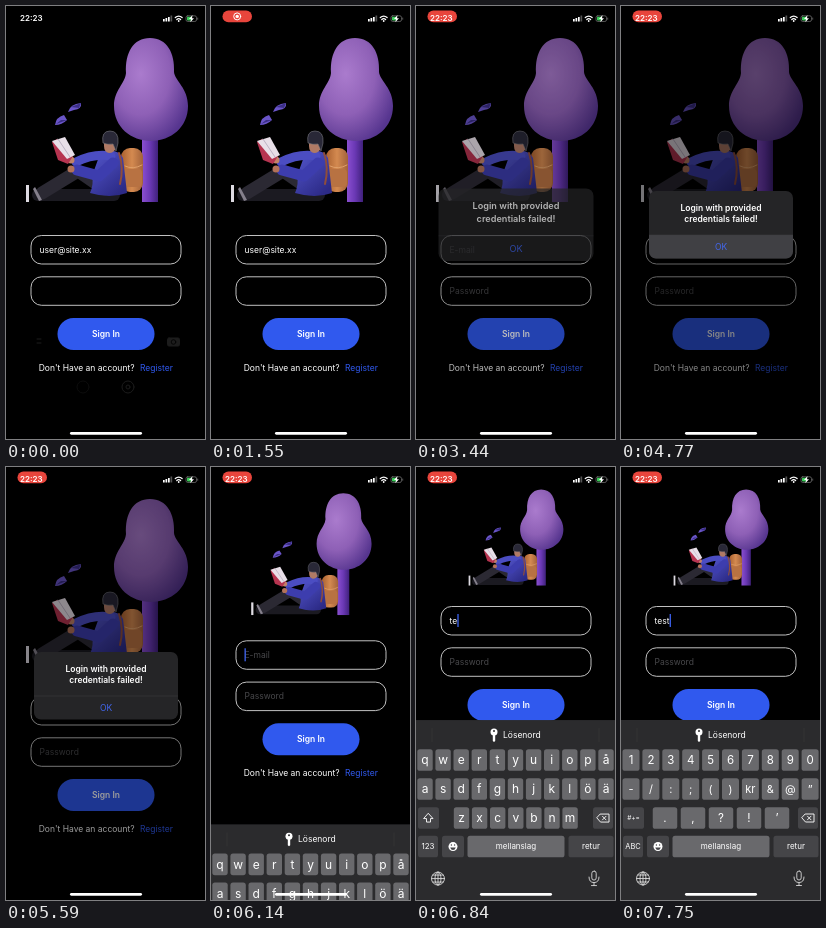
These frames come from a looping animation (199 by 433 pixels, 8 s). An HTML page:

```html
<!DOCTYPE html>
<html lang="en">
<head>
<meta charset="utf-8">
<title>Sign in</title>
<style>
html, body { margin: 0; width: 100%; height: 100%; overflow: hidden; background: #000; }
svg { display: block; width: 100vw; height: 100vh; font: 8.5px Inter, "Noto Sans", sans-serif; fill: #fff; }
.mid { text-anchor: middle; }
.hint { fill: #48484b; }
.field { fill: #000; stroke: #d6d6d6; stroke-width: .9; }
.line { fill: none; stroke-linecap: round; stroke-linejoin: round; }
</style>
</head>
<body>
<svg viewBox="0 0 199 433">
  <defs>
    <radialGradient id="crown" cx=".36" cy=".35" r=".72">
      <stop offset="0" stop-color="#aa7bcd"/><stop offset=".55" stop-color="#8e60b6"/><stop offset="1" stop-color="#56358f"/>
    </radialGradient>
    <linearGradient id="trunk">
      <stop offset="0" stop-color="#8a4fd0"/><stop offset=".5" stop-color="#6a38b4"/><stop offset="1" stop-color="#40217c"/>
    </linearGradient>
    <linearGradient id="coat" x2=".7" y2="1">
      <stop offset="0" stop-color="#5558cf"/><stop offset="1" stop-color="#2c2a86"/>
    </linearGradient>
    <linearGradient id="bag">
      <stop offset="0" stop-color="#a9602f"/><stop offset=".5" stop-color="#d48a50"/><stop offset="1" stop-color="#a2623a"/>
    </linearGradient>
  </defs>
  <rect width="199" height="433" fill="#000"/>

  <g id="login">
    <g id="art">
      <path fill="url(#trunk)" d="M136 128H152V196H136Z"/>
      <path fill="url(#crown)" d="M144 32C161 32 169 47 168 66C169 75 182 82 182 100C182 121 165 135 145 135C125 135 108 121 108 100C108 84 119 78 120 67C119 47 127 32 144 32Z"/>
      <path fill="#6a55c8" d="M62 106Q64 98 75 97Q76 103 68 104ZM49 119Q50 111 58 109L61 114Q56 119 49 119Z"/>
      <path fill="#3b2f86" d="M65 101L75 97L73 102ZM50 118L55 114L61 114Z"/>
      <path class="line" stroke="#1b1a21" stroke-width="12" d="M108 189L32 189"/>
      <path class="line" stroke="#2b2933" stroke-width="13" d="M98 183L72 165L36 187"/>
      <path fill="#dedbe2" d="M20 179H23V196H20Z"/>
      <path fill="#85808c" d="M27 183L29 181L36 194L33 195Z"/>
      <rect x="115" y="142" width="22" height="44" rx="9" fill="url(#bag)"/>
      <rect x="118" y="163" width="18" height="18" rx="4" fill="#b87242"/>
      <path class="line" stroke="#e0a06a" d="M119 160Q127 164 136 159"/>
      <path fill="url(#coat)" d="M94 148Q110 140 117 152L121 187Q104 193 84 187Q88 178 86 170Z"/>
      <path class="line" stroke="#4b4dc2" stroke-width="9" d="M105 150Q88 147 70 156"/>
      <path class="line" stroke="#3d3dae" stroke-width="11" d="M107 157L93 170L71 164"/>
      <path class="line" stroke="#8f4d3b" stroke-width="2" d="M113 147Q118 162 114 178"/>
      <circle cx="65" cy="154" r="3.5" fill="#c28268"/>
      <circle cx="65" cy="163" r="3.5" fill="#b37259"/>
      <path fill="#b63450" d="M46 136L51 133L67 150L62 158L52 154Z"/>
      <path fill="#e8dfe8" d="M46 135L59 131L69 149L61 153Z"/>
      <path class="line" stroke="#a99eb3" stroke-width=".7" d="M52 133L64 151"/>
      <path fill="#b07a65" d="M98 135H110V142Q108 147 103 147Q98 146 98 140Z"/>
      <path fill="#292837" stroke="#77777f" stroke-width=".6" d="M97 137Q95 125 104 125Q113 125 112 137L110 145L107 138Q102 139 97 137Z"/>
    </g>
    <g id="form">
      <rect class="field" x="25" y="229.5" width="150" height="28.5" rx="10.5"/>
      <text id="email" x="33.5" y="247">E-mail</text>
      <rect id="caret" y="237" width="1.3" height="13" fill="#3d63f2"/>
      <rect class="field" x="25" y="270.8" width="150" height="28.5" rx="10.5"/>
      <text id="password" class="hint" x="33.5" y="288.2">Password</text>
      <g id="button">
        <rect x="51.5" y="312" width="97" height="32" rx="16" fill="#3059ee"/>
        <text class="mid" x="100" y="331" font-weight="600">Sign In</text>
      </g>
      <text x="32.7" y="365">Don't Have an account?</text>
      <text x="134" y="365" fill="#3059ee">Register</text>
    </g>
    <g id="ghost" class="line" stroke="#1c1c1c">
      <rect x="161.500" y="332" width="12" height="8" rx="1.500" fill="#1c1c1c"/>
      <circle cx="167.500" cy="336" r="2.300" stroke="#050505"/>
      <path d="M31 333H35M31 337H35"/>
      <circle cx="122" cy="381" r="6"/><circle cx="122" cy="381" r="2"/>
      <circle cx="77" cy="381" r="6" stroke="#0d0d0d"/>
    </g>
  </g>

  <g id="spinner" class="line" stroke-width="1"></g>
  <rect id="dim" width="199" height="433" fill="#000"/>

  <g id="alert">
    <rect x="28" y="185" width="144" height="67.5" rx="7" fill="#252527"/>
    <path id="press" fill="#404044" d="M28 229H172V245.500A7 7 0 0 1 165 252.500H35A7 7 0 0 1 28 245.500Z"/>
    <path d="M28 229H172" stroke="#3d3d40" stroke-width=".5"/>
    <g class="mid" font-weight="600">
      <text x="100" y="204.500">Login with provided</text>
      <text x="100" y="216">credentials failed!</text>
    </g>
    <text class="mid" x="100" y="244" fill="#4266ec">OK</text>
  </g>

  <g id="keyboard">
    <rect y="253" width="199" height="190" fill="#2b2b2d"/>
    <path d="M16 261V275M183 261V275" stroke="#39393b" stroke-width=".6"/>
    <circle cx="78" cy="265" r="3.500"/><path d="M76.800 267H79.200V274L78 275L76.800 274Z"/>
    <circle cx="78" cy="264" r="1" fill="#2b2b2d"/>
    <text x="87" y="271">Lösenord</text>
    <g id="letters"></g>
    <g id="symbols"></g>
    <g id="common"></g>
    <g class="line" stroke="#d8d8d8" stroke-width=".9">
      <circle cx="22" cy="411.500" r="6.500"/><ellipse cx="22" cy="411.500" rx="3" ry="6.500"/>
      <path d="M22 405V418M15.500 411.500H28.500M17 408H27M17 415H27"/>
      <rect x="175.800" y="404" width="4.400" height="9" rx="2.200"/>
      <path d="M173 410Q173 415.500 178 415.500Q183 415.500 183 410M178 415.500V418.500M175.500 418.500H180.500"/>
    </g>
  </g>

  <g id="status">
    <rect id="pill" x="11.500" y="4.500" width="29.500" height="11.800" rx="5.900" fill="#e8453c"/>
    <text id="clock" class="mid" x="25.300" y="15.400" font-size="8" font-weight="600">22:23</text>
    <g id="record"><circle class="line" cx="26.200" cy="10.400" r="3.500" stroke="#fff"/><circle cx="26.200" cy="10.400" r="1.700"/></g>
    <path d="M157 13H158.700V15.500H157ZM159.500 12H161.200V15.500H159.500ZM162 11H163.700V15.500H162Z"/>
    <path fill="#555" d="M164.500 9.500H166.200V15.500H164.500Z"/>
    <path class="line" stroke="#fff" stroke-width="1.300" d="M169.300 11.600Q172.700 8.700 176.100 11.600M170.800 13.500Q172.700 11.900 174.600 13.500"/>
    <circle cx="172.700" cy="15" r=".9"/>
    <rect class="line" x="180" y="9.800" width="10.500" height="5.700" rx="1.700" stroke="#777" stroke-width=".7"/>
    <rect x="181" y="10.700" width="5" height="3.900" rx=".8" fill="#3ccb5a"/>
    <path d="M186.500 9L183 13H185L184.300 16.300L188 12.200H186Z"/>
    <path d="M191.700 11.600V13.700" stroke="#777" stroke-width=".7"/>
  </g>
  <rect x="64" y="426" width="72" height="2.700" rx="1.350"/>
</svg>
<script>
const $ = id => document.getElementById(id);
const clamp = x => Math.max(0, Math.min(1, x));
const ramp = (t, a, b) => clamp((t - a) / (b - a));
const show = (id, on) => $(id).setAttribute('opacity', Number(on));
// critically damped rise from 0 to 1
const spring = x => x <= 0 ? 0 : 1 - (1 + x) * Math.exp(-x);

function key(cx, cy, w, label, size = 12, fill = '#69696c') {
  return `<rect x="${cx - w / 2}" y="${cy - 10.8}" width="${w}" height="21.6" rx="2.6" fill="${fill}"/>
    <text class="mid" x="${cx}" y="${cy + size * .35}" font-size="${size}">${label}</text>`;
}
const row = (chars, x, y, pitch, w, size) =>
  chars.split(' ').map((c, i) => key(x + i * pitch, y, w, c, size)).join('');
const dark = '#454548';

$('letters').innerHTML =
  row('q w e r t y u i o p å', 9, 293, 18.1, 15.4) +
  row('a s d f g h j k l ö ä', 9, 322, 18.1, 15.4) +
  row('z x c v b n m', 45.5, 351, 18.1, 15.4) +
  key(12.5, 351, 21, '', 8, dark) + key(12, 379.5, 20, '123', 8, dark) +
  '<path class="line" stroke="#fff" stroke-width=".9" d="M12.500 346.500L17 351.500H14.500V355H10.500V351.500H8Z"/>';
$('symbols').innerHTML =
  row('1 2 3 4 5 6 7 8 9 0', 10, 293, 19.9, 17, 11.5) +
  row('- / : ; ( ) kr &amp; @ ”', 10, 322, 19.9, 17, 11) +
  row('. , ? ! ’', 44, 351, 28, 24.5, 11.5) +
  key(12.5, 351, 21, '#+=', 6.5, dark) + key(12, 379.5, 20, 'ABC', 7.5, dark);
$('common').innerHTML =
  key(187, 351, 20, '', 8, dark) + key(37, 379.5, 22, '', 8, dark) +
  key(100, 379.5, 97, 'mellanslag', 8) + key(175, 379.5, 45, 'retur', 8, dark) +
  `<g class="line" stroke="#fff" stroke-width=".9"><path d="M184.500 347H193V355H184.500L181 351ZM186.500 349.200L190 352.800M190 349.200L186.500 352.800"/></g>
   <circle cx="37" cy="379.500" r="4.500"/>
   <path d="M34.200 380.500H39.800Q39 383 37 383Q35 383 34.200 380.500Z" fill="${dark}"/>
   <circle cx="35.400" cy="378" r=".7" fill="${dark}"/><circle cx="38.600" cy="378" r=".7" fill="${dark}"/>`;

$('spinner').innerHTML = Array.from({ length: 8 }, (_, i) =>
  `<path d="M0 -2.700V-4.900" transform="translate(100 219) rotate(${i * 45})"/>`).join('');
const spokes = [...$('spinner').children];

const strokes = [6640, 6840, 7040, 7240];

function draw(t) {
  const loading = t >= 2690 && t < 3340;
  show('login', !loading);
  show('spinner', loading);
  const tick = Math.floor(t / 100);
  spokes.forEach((s, i) => {
    const v = 100 - ((tick - i) % 8 + 8) % 8 * 8;
    s.setAttribute('stroke', `rgb(${v},${v},${v})`);
  });
  show('ghost', 1 - ramp(t, 50, 200));
  show('button', 1 - .7 * ramp(t, 2540, 2640) * (t < 3340));

  // status bar
  const icon = t >= 1450 && t < 3340;
  show('pill', ramp(t, 500, 700));
  show('clock', !icon);
  show('record', icon);

  // alert
  const enter = spring((t - 3340) * .0183);
  const seen = enter * (1 - ramp(t, 5540, 5820));
  show('dim', .48 * seen);
  show('alert', clamp(seen * 1.25));
  show('press', ramp(t, 4650, 4750) * (t < 5590));
  const zoom = 1.17 - .17 * enter;
  $('alert').setAttribute('transform', `translate(100 219) scale(${zoom}) translate(-100 -219)`);

  // keyboard and the layout that makes room for it
  const k = t < 6140 ? 0 : t < 6240 ? 6140 : t;
  const lift = spring((k - 5986) * .0136), rise = spring((k - 6027) * .0127);
  $('art').setAttribute('transform', `translate(${101 - lift} ${31 - 9 * lift}) scale(${1 - .415 * lift}) translate(-101 -31)`);
  $('form').setAttribute('transform', `translate(0 ${-90 * lift})`);
  $('keyboard').setAttribute('transform', `translate(0 ${180 * (1 - rise)})`);
  show('letters', t < 7440);
  show('symbols', t >= 7440);

  // fields
  const typed = t < 2690 ? 'user@site.xx' : 'test'.slice(0, strokes.filter(s => t >= s).length);
  const email = $('email');
  email.textContent = typed || 'E-mail';
  email.setAttribute('class', typed ? '' : 'hint');
  show('password', t >= 2690);
  show('caret', t >= 6000);
  $('caret').setAttribute('x', typed ? 33.7 + email.getComputedTextLength() : 33.5);
}

function frame(now) {
  draw(now % 8000);
  requestAnimationFrame(frame);
}
draw(0);
requestAnimationFrame(frame);
</script>
</body>
</html>
```
